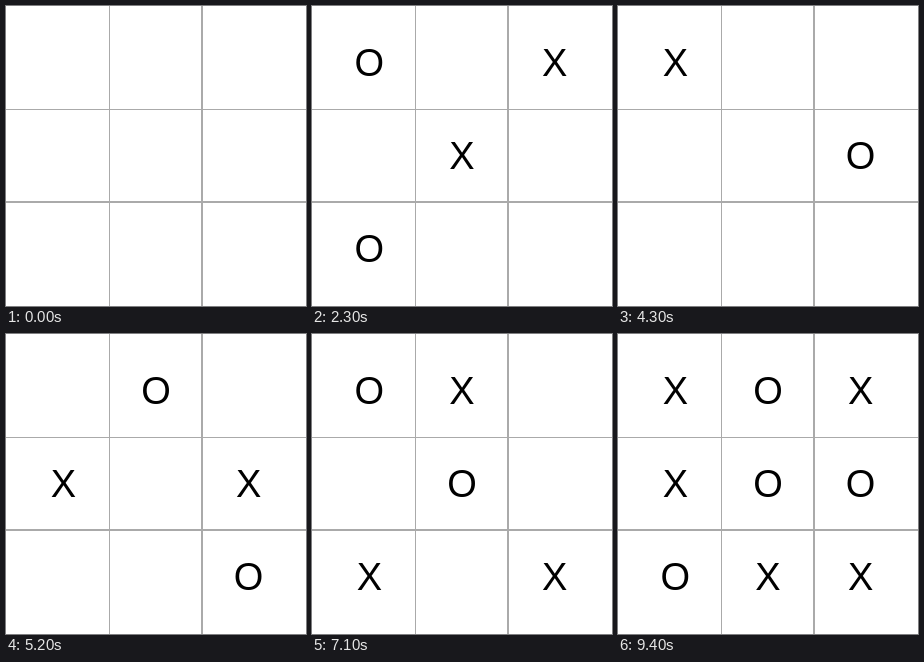
An HTML page that plays this animation: 300x300 px, repeating every 9.6 s.

```html
<!DOCTYPE html>
<html lang="en">
<head>
<meta charset="utf-8">
<title>Tic-tac-toe</title>
<style>
  html, body { margin: 0; width: 100%; height: 100%; overflow: hidden; background: #fff; }
  svg { display: block; width: 100vw; height: 100vh; }
  text { font: 38px "Liberation Sans", Arial, sans-serif; text-anchor: middle; }
  .grid { fill: #aaa; shape-rendering: crispEdges; }
  .strike { stroke: #f00; stroke-width: 4; stroke-linecap: round; }
</style>
</head>
<body>
<svg viewBox="0 0 300 300">
  <g class="grid">
    <rect x="103" width="1" height="300"/>
    <rect x="195" width="2" height="300"/>
    <rect y="103" width="300" height="1"/>
    <rect y="195" width="300" height="2"/>
  </g>
  <g id="marks"></g>
  <g id="strikes" class="strike"></g>
</svg>
<script>
const STEP = 100;
const CELL = 92.6;
const MID = 150;

// Each digit is the cell taken by X and O in turn.
const games = ["10546328", "0143672", "402617358", "507216384", "05428",
               "31584", "305467821", "6410857", "42638150", "042175368"];
const rows = ["012", "345", "678", "036", "147", "258", "048", "246"];

const marksLayer = document.getElementById("marks");
const strikeLayer = document.getElementById("strikes");

function add(parent, tag, attrs) {
  const el = document.createElementNS("http://www.w3.org/2000/svg", tag);
  for (const key in attrs) el.setAttribute(key, attrs[key]);
  return parent.appendChild(el);
}

const column = cell => cell % 3 - 1;
const line = cell => Math.floor(cell / 3) - 1;

const labels = Array.from({ length: 9 }, (_, cell) =>
  add(marksLayer, "text", { x: MID + column(cell) * CELL, y: MID + 13 + line(cell) * CELL }));

function drawStrike(row) {
  const [a, , b] = row;
  const diagonal = column(a) !== column(b) && line(a) !== line(b);
  const reach = diagonal ? 1.3 : 1.5;
  const place = (from, to) => MID + CELL * (from === to ? from : from * reach);
  add(strikeLayer, "line", {
    x1: place(column(a), column(b)), y1: place(line(a), line(b)),
    x2: place(column(b), column(a)), y2: place(line(b), line(a))
  });
}

function drawBoard(moves) {
  const board = Array(9).fill("");
  [...moves].forEach((cell, turn) => board[cell] = turn % 2 ? "O" : "X");
  labels.forEach((label, cell) => label.textContent = board[cell]);
  strikeLayer.replaceChildren();
  rows.filter(([a, b, c]) => board[a] && board[a] === board[b] && board[a] === board[c])
      .forEach(drawStrike);
}

// An empty board opens each game; the final position stays for two steps.
const timeline = games.flatMap(game =>
  Array.from({ length: game.length + 2 }, (_, count) => game.slice(0, count)));

let shown;
const start = performance.now();

function tick() {
  const elapsed = performance.now() - start;
  const moves = timeline[Math.floor(elapsed / STEP) % timeline.length];
  if (moves !== shown) drawBoard(shown = moves);
  requestAnimationFrame(tick);
}
tick();
</script>
</body>
</html>
```
